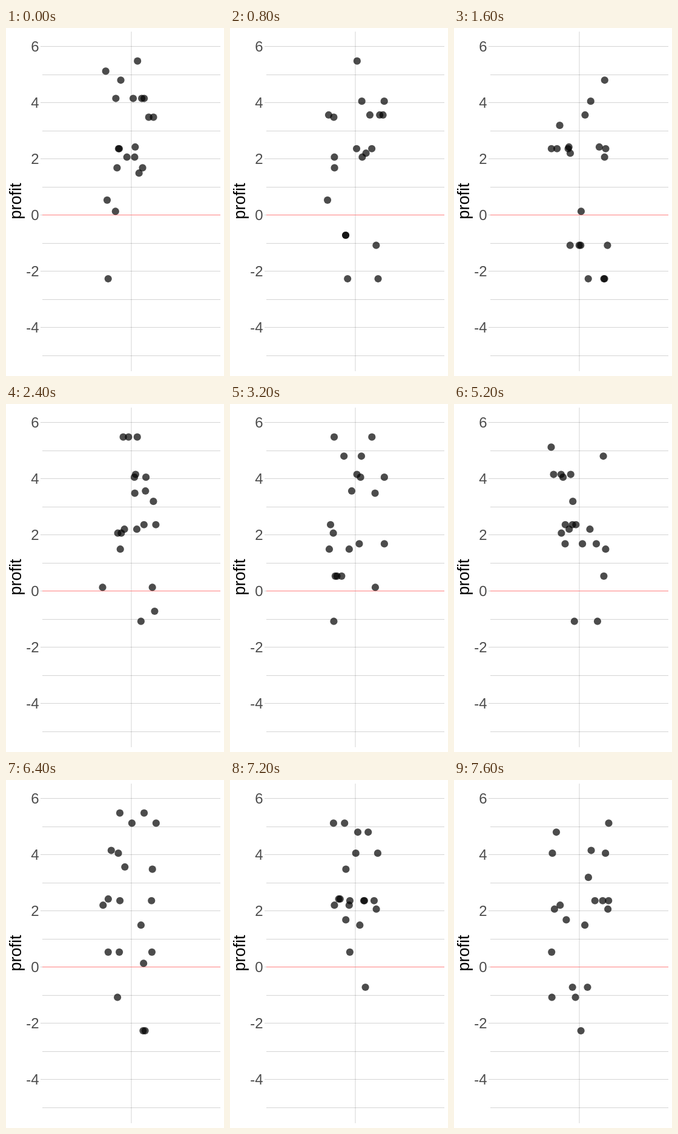
Recreate the animation shown at these times as an HTML page. Size 360x576 px, loop 8000 ms.

```html
<!DOCTYPE html>
<html lang="en">
<head>
<meta charset="utf-8">
<title>Profit samples</title>
<style>
  html, body { margin: 0; width: 100%; height: 100%; overflow: hidden; background: #fff; }
  svg { display: block; width: 100vw; height: 100vh; }
  text { font-family: "Liberation Sans", Arial, sans-serif; }
  .tick { font-size: 24px; fill: #4d4d4d; text-anchor: end; }
  .title { font-size: 27px; fill: #000; text-anchor: middle; }
  .grid { stroke: #000; stroke-opacity: .17; }
  .zero { stroke: #ff7f7f; }
  .dots { fill: #000; fill-opacity: .7; }
</style>
</head>
<body>
<svg viewBox="0 0 360 576">
  <g id="axes"></g>
  <text class="title" transform="translate(24.8 286.6) rotate(-90)">profit</text>
  <g id="dots" class="dots"></g>
</svg>
<script>
const NS = "http://www.w3.org/2000/svg";
const STEP = 400, STEPS = 20, COUNT = 20;
const LEFT = 60, RIGHT = 354, MID = 207, JITTER = 48.5;
const axes = document.getElementById("axes");
const dots = document.getElementById("dots");

// Observed profits; each step resamples them with replacement.
const profits = [5.48, 5.12, 4.8, 4.15, 4.05, 3.56, 3.48, 3.19, 2.42, 2.36,
  2.36, 2.2, 2.06, 1.68, 1.49, .53, .13, -.72, -1.08, -2.27];

const yOf = v => 309.5 - 46.5 * v;

function add(parent, tag, attrs, text) {
  const el = document.createElementNS(NS, tag);
  for (const k in attrs) el.setAttribute(k, attrs[k]);
  if (text !== undefined) el.textContent = text;
  return parent.appendChild(el);
}

function line(cls, x1, y1, x2, y2) {
  add(axes, "line", { class: cls, x1, y1, x2, y2 });
}

for (let v = -5; v <= 6; v++) {
  const y = Math.floor(yOf(v)) + .5;
  const major = v % 2 === 0;
  line("grid", major ? LEFT - 3 : LEFT, y, RIGHT, y);
  if (major) add(axes, "text", { class: "tick", x: 54.5, y: yOf(v) + 8.6 }, v);
}
line("grid", MID, 6, MID, 568);
line("zero", LEFT, yOf(0), RIGHT, yOf(0));

function rng(seed) {
  let s = seed;
  return () => {
    s = (s + 0x6D2B79F5) | 0;
    let h = Math.imul(s ^ (s >>> 15), 1 | s);
    h = (h + Math.imul(h ^ (h >>> 7), 61 | h)) ^ h;
    return ((h ^ (h >>> 14)) >>> 0) / 4294967296;
  };
}

const circles = Array.from({ length: COUNT }, () => add(dots, "circle", { r: 6.1 }));
let shown = -1;

function show(step) {
  if (step === shown) return;
  shown = step;
  const rand = rng(step * 7919 + 17);
  for (const c of circles) {
    c.setAttribute("cx", MID + JITTER * (2 * rand() - 1));
    c.setAttribute("cy", yOf(profits[Math.floor(rand() * profits.length)]));
  }
}

show(0);
const start = performance.now();
function tick() {
  const t = Math.max(0, performance.now() - start);
  show(Math.floor(t / STEP) % STEPS);
  requestAnimationFrame(tick);
}
requestAnimationFrame(tick);
</script>
</body>
</html>
```
